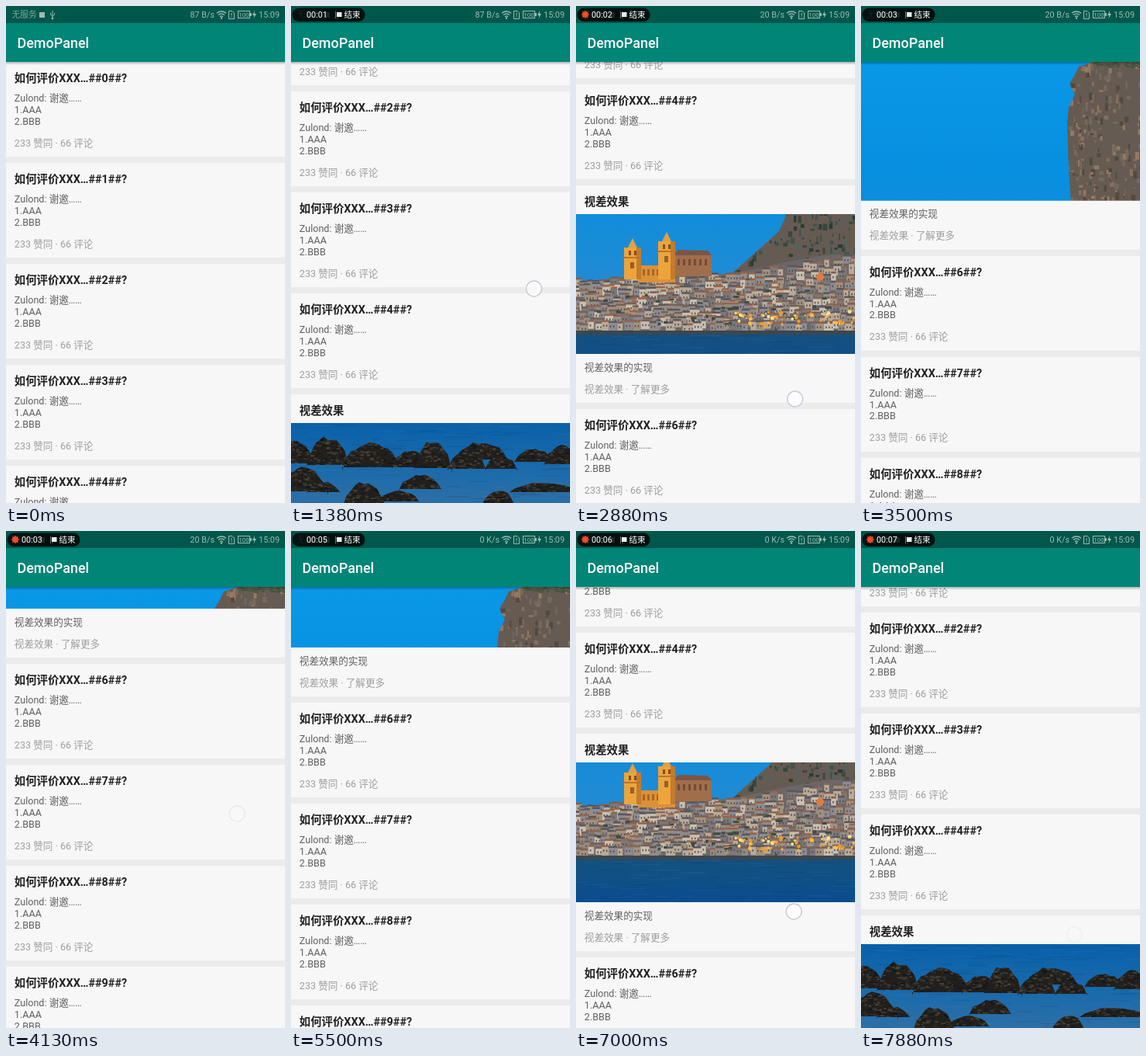
Animation of 360x640 px, one loop 8 s. Source, as an HTML page with a canvas:

```html
<!DOCTYPE html>
<html lang="zh">
<head>
<meta charset="utf-8">
<style>
html, body { margin: 0; width: 100%; height: 100%; overflow: hidden; background: #ebebeb; }
canvas { display: block; }
</style>
</head>
<body>
<canvas id="stage" width="360" height="640"></canvas>
<script>
const stage = document.getElementById('stage');
const FONT = 'Roboto, "Noto Sans CJK SC", "Noto Sans CJK", sans-serif';
let g = stage.getContext('2d');

let seed = 7;
const rnd = (a = 0, b = 1) => {
  seed = (seed * 16807) % 2147483647;
  return a + (b - a) * seed / 2147483647;
};
const pick = list => list[Math.floor(rnd(0, list.length))];

function rect(x, y, w, h, color) {
  g.fillStyle = color;
  g.fillRect(x, y, w, h);
}
function poly(points, color) {
  g.fillStyle = color;
  g.beginPath();
  for (let i = 0; i < points.length; i += 2) g.lineTo(points[i], points[i + 1]);
  g.fill();
}
function fade(y0, y1, ...colors) {
  const f = g.createLinearGradient(0, y0, 0, y1);
  colors.forEach((c, i) => f.addColorStop(i / (colors.length - 1), c));
  rect(0, y0, 360, y1 - y0, f);
}
function text(s, x, y, size, color, weight = 400, align = 'left') {
  g.font = `${weight} ${size}px ${FONT}`;
  g.textAlign = align;
  g.fillStyle = color;
  g.fillText(s, x, y);
}
function disc(x, y, r, color) {
  g.fillStyle = color;
  g.beginPath();
  g.arc(x, y, r, 0, 7);
  g.fill();
}

// Backdrop behind the list: cliff, town, sea, rocks
function cliff() {
  const edge = [360, 72, 300, 72, 281, 78, 274, 92, 269, 100, 276, 114, 268, 130, 266, 150, 268, 210,
    272, 268, 262, 290, 240, 310, 214, 333, 195, 350, 360, 350];
  g.save();
  poly(edge, '#665b52');
  g.clip();
  for (let i = 0; i < 520; i++) {
    const y = rnd(72, 350), low = y > 255;
    rect(rnd(190, 360), y, rnd(1, 6), rnd(2, 10),
      pick(low ? ['#35483f', '#43514a', '#2b3b35', '#59605a'] : ['#86705c', '#52493f', '#75695e', '#967a60']));
  }
  for (let i = 0; i < 40; i++) rect(rnd(300, 360), rnd(72, 78), 4, 2, '#47543c');
  g.restore();
}

function town() {
  poly([0, 358, 60, 349, 175, 347, 215, 342, 270, 330, 320, 321, 360, 320, 360, 424, 0, 424], '#6b6768');
  const top = x => x < 200 ? 354 - x / 30 : 348 - (x - 200) / 6;
  for (let row = 0; row < 9; row++) {
    for (let x = -4; x < 360; x += rnd(6, 13)) {
      const y = top(x) + (408 - top(x)) * row / 8 + rnd(-3, 3);
      const w = rnd(6, 14), h = rnd(8, 14);
      rect(x, y, w, h, pick(['#b9ab98', '#938b84', '#cabfae', '#7c7878', '#a2917f', '#8e8b90']));
      rect(x, y - 2, w, 2.5, pick(['#94654b', '#7b6056', '#59575c']));
      for (let k = 2; k < w - 2; k += 4) rect(x + k, y + 4, 1.5, 2.5, '#514f56');
    }
  }
  for (let i = 0; i < 38; i++) rect(rnd(0, 360), rnd(365, 416), rnd(3, 9), rnd(2, 4), '#3d4c42');
  for (let i = 0; i < 55; i++) disc(rnd(205, 360), rnd(393, 412), rnd(.8, 2.6), pick(['#ffbd45', '#f39a27', '#ffe08a']));
  disc(315, 349, 5, '#e27a3c');
  rect(0, 418, 360, 5, '#3c474f');
}

function church() {
  rect(127, 320, 48, 28, '#a06e4a');
  poly([125, 321, 132, 314, 170, 315, 175, 321], '#7b5545');
  for (let x = 131; x < 172; x += 7) rect(x, 326, 3, 8, '#724c3b');
  rect(80, 334, 48, 22, '#dc9138');
  for (let x = 86; x < 106; x += 6) rect(x, 339, 3, 8, '#a86529');
  for (const [x, y] of [[62, 311], [106, 303]]) {
    rect(x, y, 22, 352 - y, '#eda43c');
    rect(x + 16, y, 6, 352 - y, '#c37b2d');
    rect(x - 1, y + 12, 24, 2, '#ba742c');
    poly([x + 5, y, x + 11, y - 12, x + 17, y], '#e0a044');
    rect(x + 6, y + 4, 3, 6, '#83501f');
    rect(x + 13, y + 4, 3, 6, '#83501f');
    rect(x + 8, y + 19, 5, 8, '#95602a');
  }
}

function rock(x, y, w, h) {
  const points = [x, y + h];
  const n = Math.ceil(w / 6);
  for (let i = 0; i <= n; i++) {
    const u = i / n;
    points.push(x + w * u, y + h * (1 - Math.sin(Math.PI * u) ** .6) + rnd(0, h * .16));
  }
  points.push(x + w, y + h);
  g.save();
  poly(points, '#211f1c');
  g.clip();
  for (let i = 0; i < w * h / 14; i++)
    rect(x + rnd(0, w), y + h * rnd() ** 1.4, rnd(2, 6), rnd(1, 2.5), pick(['#3c362c', '#14161a', '#4b4234', '#2a2824']));
  g.restore();
}

function paintScene() {
  const c = document.createElement('canvas');
  c.width = 360;
  c.height = 640;
  const main = g;
  g = c.getContext('2d');
  fade(72, 360, '#0998e6', '#078fe0', '#238ad2');
  cliff();
  town();
  church();
  fade(423, 640, '#15517f', '#0a4d8f', '#0960a8', '#1769ac', '#2c6fa6');
  for (let i = 0; i < 260; i++)
    rect(rnd(-20, 360), rnd(424, 640), rnd(8, 40), 1, pick(['rgba(3,45,95,.18)', 'rgba(90,150,200,.12)']));
  const rocks = [[-20, 559, 50, 30], [20, 553, 55, 38], [66, 560, 76, 34], [130, 570, 50, 24], [158, 559, 50, 36],
    [202, 572, 50, 24], [212, 560, 68, 24], [250, 578, 42, 18], [288, 569, 50, 18], [326, 565, 46, 25],
    [-20, 593, 68, 32], [20, 612, 44, 14], [139, 603, 55, 19], [66, 611, 56, 32], [112, 623, 54, 15],
    [244, 622, 48, 26], [282, 613, 90, 13]];
  rocks.forEach(r => rock(...r));
  g = main;
  return c;
}
const scene = paintScene();

// Scroll offset over time, monotone cubic through these points
const T = [0, .25, 1.375, 2.875, 4.125, 4.4, 4.8, 5.5, 7, 7.875, 8.1];
const S = [0, 0, 222, 491, 839, 850, 850, 789, 461, 227, 190];
const rise = i => (S[i + 1] - S[i]) / (T[i + 1] - T[i]);
function slope(i) {
  if (i === 0 || i === T.length - 1) return 0;
  const a = rise(i - 1), b = rise(i);
  return a * b <= 0 ? 0 : 2 * a * b / (a + b);
}
function scrollAt(t) {
  let i = 0;
  while (t > T[i + 1]) i++;
  const d = T[i + 1] - T[i], u = (t - T[i]) / d;
  const k = u * u * (3 - 2 * u);
  return S[i] + (S[i + 1] - S[i]) * k + d * u * (1 - u) * (slope(i) * (1 - u) - slope(i + 1) * u);
}

// Touches: start, end, x at start, x at end, finger y + scroll
const touches = [[.35, 1.6, 302, 316, 586], [2.55, 3.3, 277, 290, 997], [3.55, 4.17, 288, 299, 1203],
  [5.55, 6.05, 290, 284, 1110], [6.35, 7.2, 288, 279, 951], [7.4, 7.9, 284, 275, 747]];

function drawTouch(t, s) {
  for (const [a, b, x0, x1, c] of touches) {
    if (t < a || t > b) continue;
    g.globalAlpha = Math.min(1, (t - a) / .12, (b - t) / .15);
    const x = x0 + (x1 - x0) * (t - a) / (b - a);
    disc(x, c - s, 10, 'rgba(255,255,255,.65)');
    g.strokeStyle = '#c9c9d8';
    g.lineWidth = 1.4;
    g.stroke();
    g.globalAlpha = 1;
  }
}

function drawCard(k, s) {
  const y = 72 + 130 * k + (k > 5 ? 158 : 0) - s;
  if (y > 640 || y < -290) return;
  const title = str => text(str, 10.8, y + 26.2, 14.4, '#212121', 700);
  const line = (str, dy, color = '#616161') => text(str, 10.8, y + dy, 12.6, color);
  if (k === 5) {
    rect(0, y, 360, 37, '#f7f7f7');
    g.drawImage(scene, 0, 0);
    return;
  }
  rect(0, y, 360, 122, '#f7f7f7');
  title(`如何评价XXX…##${k}##?`);
  line('Zulond: 谢邀……', 51);
  line('1.AAA', 65.8);
  line('2.BBB', 80.5);
  line('233 赞同 · 66 评论', 108.5, '#9e9e9e');
}

function drawParallax(s) {
  const y = 722 - s;
  rect(0, y, 360, 280, '#f7f7f7');
  text('视差效果', 10.8, y + 26.2, 14.4, '#212121', 700);
  g.save();
  g.beginPath();
  g.rect(0, y + 37, 360, 180);
  g.clip();
  g.drawImage(scene, 0, 0);
  g.restore();
  text('视差效果的实现', 10.8, y + 238.5, 12.6, '#616161');
  text('视差效果 · 了解更多', 10.8, y + 266.5, 12.6, '#9e9e9e');
}

function drawStatus(t) {
  const pale = '#9dbab5';
  rect(0, 0, 360, 22, '#00574b');
  text('无服务', 7.5, 15, 10.8, '#7fa59f');
  rect(43, 8, 7, 7, pale);
  g.strokeStyle = pale;
  g.lineWidth = 1;
  g.stroke(new Path2D('M60 6V16M57.5 9V11L60 13.5L62.5 11V9'));
  disc(60, 16, 1.3, pale);

  text(t < 2.2 ? '87 B/s' : t < 5 ? '20 B/s' : '0 K/s', 269, 15, 10.8, pale, 400, 'right');
  g.lineWidth = 1.3;
  for (const r of [3, 6, 9]) {
    g.beginPath();
    g.arc(278, 16, r, -2.3, -.84);
    g.stroke();
  }
  disc(278, 15.5, 1.2, pale);
  g.lineWidth = 1;
  g.stroke(new Path2D('M287.5 6.5H292L294.5 9V16.5H287.5ZM291 9V12.5M291 13.5V14.8'));
  g.strokeRect(299.5, 6.5, 15, 9);
  rect(315, 9, 1.8, 4, pale);
  text('100', 307, 14.2, 8, pale, 400, 'center');
  poly([321, 6, 318, 12, 320.3, 12, 319.5, 16, 323, 10, 320.8, 10], pale);
  text('15:09', 353, 15, 10.8, pale, 400, 'right');

  if (t < .25) return;
  const clock = t - .25;
  g.fillStyle = 'rgba(0,0,0,.8)';
  g.beginPath();
  g.roundRect(1.5, 2.5, 94, 17.5, 8.5);
  g.fill();
  if (clock % 1 >= .5) {
    disc(12, 11, 4, '#f0321e');
    g.strokeStyle = '#f0562c';
    g.lineWidth = 1.2;
    for (let i = 0; i < 8; i++) {
      const a = i * Math.PI / 4;
      g.beginPath();
      g.moveTo(12, 11);
      g.lineTo(12 + 5 * Math.cos(a), 11 + 5 * Math.sin(a));
      g.stroke();
    }
  }
  text('00:0' + Math.floor(clock), 20, 15, 10.8, '#fff');
  rect(57, 7, 1, 9, '#777');
  rect(59, 8, 6.5, 6, '#eee');
  text('结束', 68.5, 15, 10.6, '#fff');
}

function draw(t) {
  const s = scrollAt(t);
  rect(0, 0, 360, 640, '#ebebeb');
  for (let k = 0; k < 12; k++) k === 5 ? drawParallax(s) : drawCard(k, s);
  drawTouch(t, s);
  fade(72, 76, 'rgba(0,0,0,.28)', 'rgba(0,0,0,0)');
  rect(0, 22, 360, 50, '#008577');
  text('DemoPanel', 14.4, 54, 18, '#fff', 500);
  drawStatus(t);
}

function tick(now) {
  draw(Math.floor((now % 8000) / 125) * .125);
  requestAnimationFrame(tick);
}
requestAnimationFrame(tick);
</script>
</body>
</html>
```
